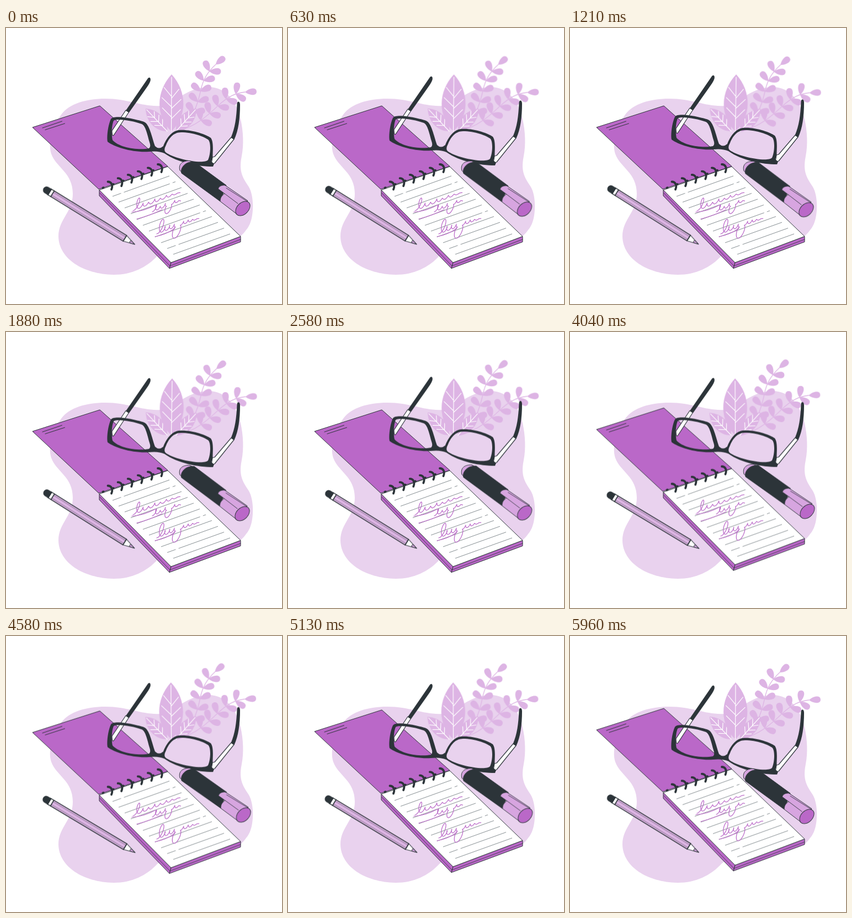
Animation of 500x500 px, one loop 6 s. Source, as an HTML page:

```html
<!DOCTYPE html>
<html lang="en">
<head>
<meta charset="utf-8">
<title>Notebook and glasses</title>
<style>
  html, body { margin: 0; width: 100%; height: 100%; overflow: hidden; background: #fff; }
  svg { display: block; width: 100vw; height: 100vh; }
  path, ellipse { stroke-linejoin: round; }
  .ink { fill: none; stroke: #2c3439; stroke-linecap: round; }
  .edge { stroke: #2c3439; }
  .main { fill: #ba68c8; }
  .soft { fill: #ddb4e4; }
  .mid { fill: #d7a5e0; }
  .white { fill: #fff; }
  .dark { fill: #2c3439; }
  .vein { fill: none; stroke: #fff; stroke-width: 1.2; stroke-linecap: round; }
  .stem { fill: none; stroke: #ddb4e4; stroke-width: 1.3; stroke-linecap: round; }
  .sign { fill: none; stroke: #ba68c8; stroke-width: 1.25; stroke-linecap: round; }
  .rule { fill: none; stroke: #667075; stroke-width: .8; }
</style>
</head>
<body>
<svg viewBox="0 0 500 500">
  <path fill="#e9d2ee" d="M100 157C114 137 146 128 180 128C222 128 246 143 280 141C308 139 322 108 367 107C400 107 418 135 425 165C430 188 431 212 427 232C421 262 430 272 440 288C450 305 450 345 438 362Q432 371 424 378C380 395 335 374 275 412C255 434 228 447 195 447C140 446 96 418 95 378C95 346 121 334 121 300C121 262 91 253 82 228C75 206 86 176 100 157Z"/>

  <g id="plants"></g>

  <g id="pad">
    <path class="main edge" d="M48 180L170 141L293 250.500L168 292Z"/>
    <path class="ink" d="M66 181L101.500 169M71 184.500L106.500 173"/>
    <path class="main edge" d="M169 293L299 425L296 435.500L169 304Z"/>
    <path class="main edge" d="M299 425L425 377.500V387.500L296 435.500Z"/>
    <path class="ink" stroke-width=".8" d="M170 299L297 431L425 383"/>
    <path class="white edge" d="M169 293.500L293 251L425 377.500L299 425Z"/>
    <g id="writing"></g>
    <g id="rings" class="ink" stroke-width="3.800"></g>
  </g>

  <g id="pencil">
    <g transform="translate(74 294) rotate(31.600)">
      <path class="white edge" stroke-width="1.300" d="M5 -6H13V6H5ZM166 -6L187 0L166 6Z"/>
      <path class="dark" d="M7 -6.500H-1C-9 -6 -9 6 -1 6.500H7Z"/>
      <path class="mid edge" d="M177 -2.600L187 0L177 2.600Z"/>
      <path class="soft edge" stroke-width="1.700" d="M12 -6H166V6H12Z"/>
      <path class="ink" stroke-width=".5" d="M12 -3H166M12 3H166"/>
    </g>
  </g>

  <g id="glasses">
    <path class="white edge" stroke-width="1.200" d="M217 149L222.500 152.500L196 193Q192 199 192 186Z"/>
    <path class="dark" d="M256.500 92C259 88 263 89 261.500 96C260 101 256 106 252 112L223 153L217 149.500Z"/>
    <path class="white edge" stroke-width="1.200" d="M408 198L413 201.500L378 245L372 247L374 234L378 233Z"/>
    <path class="dark" d="M418.500 138C418.500 132 424 132 424 139C424 164 421 186 413.500 202L407.500 198.500C415 181 417.500 162 418.500 138Z"/>
    <path class="dark" fill-rule="evenodd" d="M190 165C196 156 238 166 250 170C260 174 264 197 270 214Q277 221 285 214C290 201 299 187 313 185C335 183 363 193 371 199C377 207 374 226 374.500 234L372 242L377 246L375 251C348 251 311 244 287 227Q276 222 259 224C230 226 197 216 184 206C182 198 185 175 190 165Z
      M195 168C191 177 191 195 193 203C205 217 240 222 259 218Q263 215 260 207C256 193 253 177 246 174C230 168 200 163 195 168Z
      M290 212C295 200 303 189 317 189C338 189 360 197 367 203C372 210 370 231 366 239C358 248 304 237 289 225Q285 221 290 212Z"/>
  </g>

  <g id="marker">
    <path class="mid edge" d="M315 258C312 248 318 240 333 240.500L340 244L319 262Z"/>
    <path class="dark edge" d="M318 263C315 254 325 241 341 242.500L399 285L388 314Z"/>
    <path class="mid edge" d="M397 285L438 313L418 337L388 314C388 306 392 303 396 300L384.500 291.500C385 287 391 284 397 285Z"/>
    <path class="ink" stroke-width=".9" d="M396 300L420 318M399 290L437 314"/>
    <ellipse class="main edge" cx="429" cy="327" rx="15.300" ry="10.300" transform="rotate(-45 429 327)"/>
  </g>
</svg>
<script>
const SVG = 'http://www.w3.org/2000/svg';
const { PI, sin, cos, atan2, hypot, floor } = Math;
const el = id => document.getElementById(id);

function addPath(id, cls, d, transform = '') {
  const p = document.createElementNS(SVG, 'path');
  p.setAttribute('d', d);
  p.setAttribute('class', cls);
  p.setAttribute('transform', transform);
  el(id).append(p);
  return p;
}

function leaflet(x, y, deg, size = 21) {
  const at = (u, v) => `${u * size} ${v * size} `;
  addPath('plants', 'soft',
    `M0 0C${at(.35, -.32)}${at(1, -.42)}${at(1, 0)}C${at(1, .42)}${at(.35, .32)}0 0Z`,
    `translate(${x} ${y}) rotate(${deg})`);
}

// A stem with one leaflet at its end and five pairs behind it.
function sprig(d) {
  const stem = addPath('plants', 'stem', d);
  const total = stem.getTotalLength();
  for (let i = 0; i < 6; i++) {
    const s = total - (i ? 20 * i - 3 : 0);
    const p = stem.getPointAtLength(s), back = stem.getPointAtLength(s - 2);
    const deg = atan2(p.y - back.y, p.x - back.x) * 180 / PI;
    for (const turn of i ? [-62, 53] : [4]) leaflet(p.x, p.y, deg + turn);
  }
}

// A broad leaf from base to tip, with paired veins.
function blade(x, y, tx, ty) {
  const size = hypot(tx - x, ty - y);
  const place = `translate(${x} ${y}) rotate(${atan2(ty - y, tx - x) * 180 / PI})`;
  const at = (u, v) => `${u * size} ${v * size} `;
  addPath('plants', 'soft',
    `M0 0C${at(.25, -.28)}${at(.7, -.28)}${at(1, 0)}C${at(.7, .28)}${at(.25, .28)}0 0Z`, place);
  let veins = `M0 0L${at(.95, 0)}`;
  for (let u = .22; u < .7; u += .18) {
    const end = u + .16, reach = .68 * end * (1 - end);
    veins += `M${at(u + .03, 0)}L${at(end + .03, -reach)}M${at(u, 0)}L${at(end, reach)}`;
  }
  addPath('plants', 'vein', veins, place);
}

sprig('M310 187C338 168 347 140 353 112C357 93 365 80 380 66');
sprig('M311 187C345 178 366 158 386 139C403 124 415 118 433 116');
blade(292, 187, 253, 146);
blade(308, 187, 345, 146);
blade(299.5, 187, 300, 84);

// Ruled lines; some rows are broken near an end.
for (let row = 0; row < 11; row++) {
  const at = f => `${193 + 11 * row + 103 * f} ${305 + 10.5 * row - 37 * f}`;
  const gap = row % 9 === 0 ? .15 : row % 5 === 1 ? .9 : 1;
  addPath('writing', 'rule', `M${at(0)}L${at(gap)}M${at(Math.min(gap + .05, 1))}L${at(1)}`);
}

// Cursive word: each height is one stroke, negative ones hang below.
function scrawl(x, y, w, rise, heights) {
  const n = heights.length, points = [];
  for (let i = 0; i < n * 24; i++) {
    const t = i / (n * 24), phase = 2 * PI * n * t, h = heights[floor(n * t)];
    const lift = h * (1 - cos(phase)) / 2;
    points.push(`${x + w * t + .3 * lift + .2 * h * sin(phase)} ${y - rise * t - lift}`);
  }
  addPath('writing', 'sign', 'M' + points.join('L'));
}
scrawl(230, 331, 86, 33, [21, 8, 5, 7, 4, 5, 3, 1]);
scrawl(265, 333, 52, 20, [11, 5, 7, -15, 6, 2]);
scrawl(273, 373, 77, 28, [25, 9, 8, 7, -22, 6, 5, 3, 1]);
addPath('writing', 'sign', 'M228 333.5Q250 332 270 321M237 346Q260 340 283 329M270 378Q290 374 306 363');

for (let i = 0; i < 6; i++) {
  const place = `translate(${184.5 + 18.1 * i} ${278.5 - 6.3 * i})`;
  addPath('rings', '', 'M0 0C6 0 10 6 6.500 14M-9 11l1 -.3', place);
}

function loop(id, steps) {
  el(id).animate(steps.map(([offset, transform]) => ({ offset, transform })),
    { duration: 6000, iterations: Infinity, easing: 'linear' });
}

function sway(id, x, y, deg) {
  el(id).style.transformOrigin = `${x}px ${y}px`;
  const turn = a => `rotate(${a}deg)`;
  loop(id, [[0, turn(0)], [.25, turn(deg)], [.75, turn(-deg)], [1, turn(0)]]);
}

const rest = 'translateY(0px)', lifted = 'translateY(-10px)';
loop('glasses', [[0, rest], [.5, lifted], [1, rest]]);
loop('pad', [[0, rest], [.5, rest], [1, lifted]]);
sway('plants', 300, 187, .75);
sway('pencil', 262, 345, .8);
sway('marker', 265, 250, 1);
</script>
</body>
</html>
```
